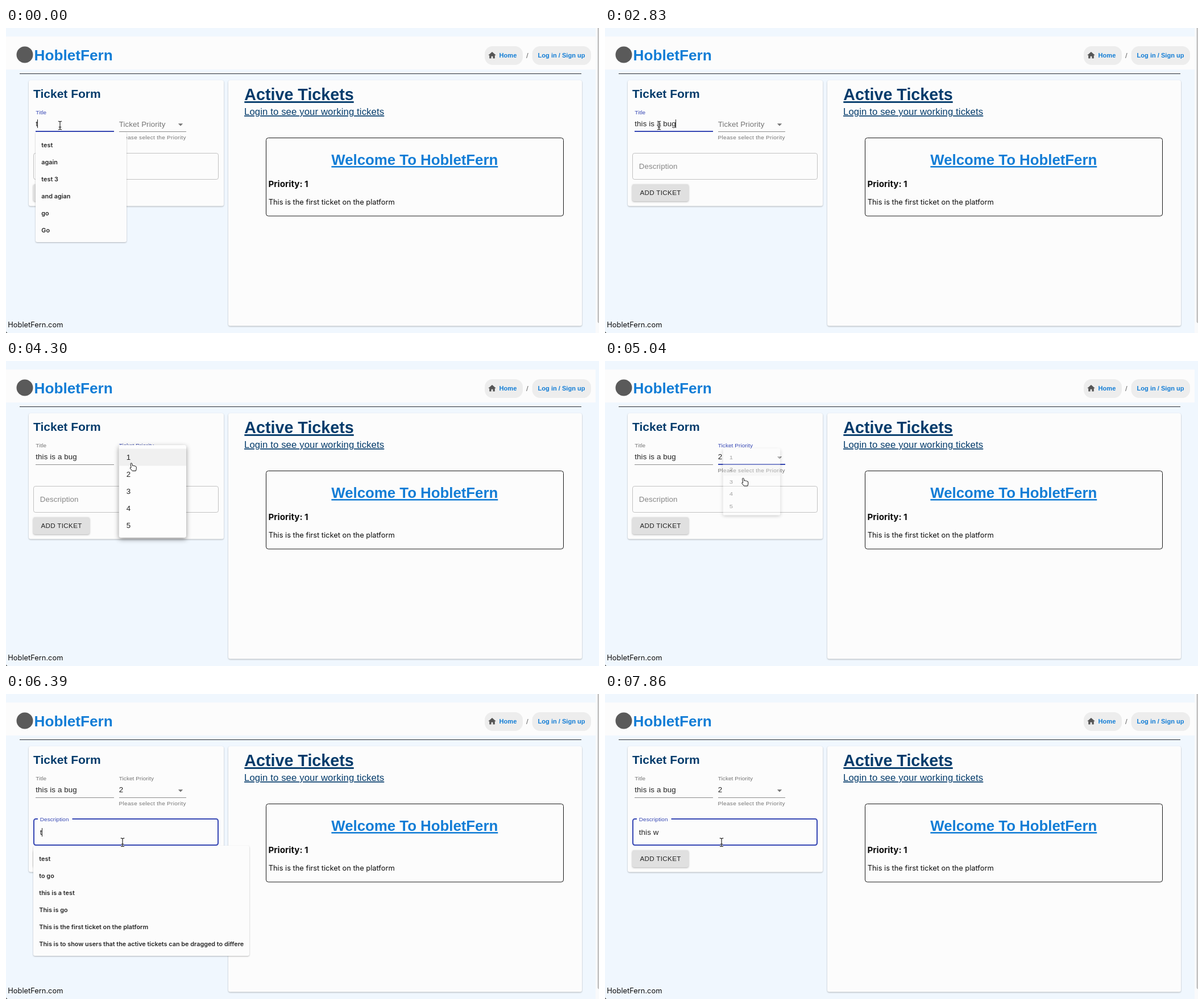
An HTML page that plays this animation: 1043x537 px, repeating every 8 s.

```html
<!DOCTYPE html>
<html lang="en">
<head>
<meta charset="utf-8">
<title>Ticket form</title>
<style>
  html, body { margin: 0; width: 100%; height: 100%; overflow: hidden; background: #f0f7fe; }
  svg { display: block; width: 100vw; height: 100vh; }
  text { font: 13.28px "Liberation Sans", Arial, sans-serif; fill: #212121; }
  .b { font-weight: 700; }
  .navy { fill: #033b6b; }
  .blue { fill: #127dd6; }
  .u { text-decoration: underline; text-decoration-thickness: 2px; }
  .sys { font-family: Inter, sans-serif; fill: #0c0c0c; }
  .sug { font: 600 10.85px Inter, sans-serif; fill: #262626; }
  .field { letter-spacing: .125px; }
  .label { letter-spacing: .125px; fill: #757575; }
  .small { font-size: 9.96px; letter-spacing: .094px; fill: #757575; }
  .card { fill: #fcfcfc; filter: drop-shadow(0 1px 1.2px rgba(0,0,0,.28)); }
  .menu { fill: #fdfdfd; filter: drop-shadow(0 3px 4px rgba(0,0,0,.42)); }
</style>
</head>
<body>
<svg viewBox="0 0 1043 537" preserveAspectRatio="none">
  <rect width="1043" height="537" fill="#f0f7fe"/>
  <rect y="15" width="1037" height="58" fill="#fcfcfc"/>
  <circle cx="33" cy="47" r="14.5" fill="#5a5a5a"/>
  <text class="b blue" x="49.5" y="57" style="font-size:26.2px">HobletFern</text>
  <rect x="842" y="32" width="67" height="33" rx="14" fill="#ededed"/>
  <path d="M855 42l-6.8 6h2v5.6h3.4v-3.8h2.8v3.8h3.4V48h2z" fill="#555"/>
  <text class="b blue" x="867.6" y="52.4" style="font-size:11.07px">Home</text>
  <text x="915" y="53" style="fill:#666">/</text>
  <rect x="925.5" y="32" width="103.5" height="33" rx="14" fill="#ededed"/>
  <text class="b blue" x="935.6" y="52.4" style="font-size:11.07px">Log in / Sign up</text>
  <path d="M24 80.5H1012" stroke="#2b2f33"/>

  <rect class="card" x="391" y="92" width="622" height="432.5" rx="3.5"/>
  <text class="b navy u" x="419.3" y="127" style="font-size:28.7px">Active Tickets</text>
  <text class="navy u" x="419" y="153" style="font-size:16.7px;letter-spacing:.125px;text-decoration-thickness:1px">Login to see your working tickets</text>
  <rect x="457.5" y="193.5" width="523" height="137.5" rx="4" fill="none" stroke="#1a1a1a"/>
  <text class="b blue u" x="718.8" y="241" text-anchor="middle" style="font-size:25.8px">Welcome To HobletFern</text>
  <text class="sys b" x="461.5" y="280" style="font-size:15.2px">Priority: 1</text>
  <text class="sys" x="461.7" y="311" style="font-size:12.85px">This is the first ticket on the platform</text>
  <text class="sys" x="3.3" y="527" style="font-size:12.85px">HobletFern.com</text>
  <path d="M0 534V537H3Q.5 536.5 0 534" fill="#444"/>

  <rect class="card" x="40" y="92" width="343" height="221.5" rx="3.5"/>
  <text class="b navy" x="48" y="123" style="font-size:21px">Ticket Form</text>

  <text class="small" id="titleLabel" x="52.3" y="152">Title</text>
  <text class="field" id="title" x="52.3" y="173"></text>
  <path id="titleLine"/>

  <path d="M199 182.5H317" stroke="#8c8c8c"/>
  <path id="prioLine" stroke-width="2"/>
  <path d="M302.8 168.2h8.4l-4.2 4.2z" fill="#757575"/>
  <text class="label" id="prioLabel">Ticket Priority</text>
  <text class="field" id="prio" x="198.8" y="173"></text>
  <text class="small" x="198.6" y="196.3" style="letter-spacing:.33px">Please select the Priority</text>

  <rect id="box" rx="3.4" fill="none"/>
  <rect id="notch" x="56" y="218" width="60.5" height="4" fill="#fcfcfc"/>
  <text class="label" id="descLabel">Description</text>
  <text class="field" id="desc" x="59.8" y="248"></text>

  <rect x="48" y="275" width="99" height="30" rx="3.4" fill="#e0e0e0" style="filter:drop-shadow(0 1.5px 1.5px rgba(0,0,0,.3))"/>
  <text x="61.5" y="294" style="font-size:11.62px;letter-spacing:.332px">ADD TICKET</text>

  <rect id="caret" width="1" height="15" fill="#222"/>
  <g id="popups"></g>
  <g id="menu">
    <rect class="menu" x="198.7" y="148" width="118.3" height="163" rx="3.4"/>
    <rect id="row" x="198.7" width="118.3" height="30" fill="#f0f0f0"/>
    <g id="digits"></g>
  </g>
  <g id="bar">
    <rect x="1037" width="6" height="537" fill="#f9fafb"/>
    <rect x="1040.5" y="-4" width="6" height="523.5" rx="3" fill="#c2c2c2"/>
  </g>
  <g id="beam" fill="none" stroke-linecap="round"></g>
  <path id="hand" fill="#fff" stroke="#111" stroke-linejoin="round"
    d="M-3.4 1.2L-4.4-5.2a1.3 1.3 0 0 1 2.6-.4L-1.1-2Q.2-3.2 1.4-1.8Q2.7-2.6 3.6-1.2Q5.4-1.6 5.7.2L5.8 3.2L4.8 7H-1.4L-5.2 2.4Q-5.4.4-3.4 1.2z"/>
</svg>
<script>
const LOOP = 8000;
const $ = id => document.getElementById(id);
const set = (id, attrs) => { for (const k in attrs) $(id).setAttribute(k, attrs[k]); };
const show = (id, on) => $(id).style.display = on ? '' : 'none';
const mix = (a, b, p) => a + (b - a) * p;

const thisRows = ['this is a test', 'This is go', 'This is the first ticket on the platform',
  'This is to show users that the active tickets can be dragged to differe'];
const popups = {
  title: [52, 183, 160, ['test', 'again', 'test 3', 'and agian', 'go', 'Go']],
  recent: [48, 267, 326, ['test', 'again', 'and agian', 'go', ...thisRows.slice(0, 2)]],
  wide: [48, 267, 380, ['test', 'to go', ...thisRows]],
  match: [48, 267, 380, thisRows]
};
$('popups').innerHTML = Object.entries(popups).map(([id, [x, y, w, rows]]) =>
  `<g id="pop-${id}"><rect class="card" x="${x}" y="${y}" width="${w}" height="${rows.length * 30 + 14}" rx="3"/>` +
  rows.map((s, i) => `<text class="sug" x="${x + 10.3}" y="${y + 26.6 + i * 30}">${s}</text>`).join('') + '</g>').join('');

$('digits').innerHTML = [0, 1, 2, 3, 4].map(i =>
  `<text x="211.8" y="${173.9 + i * 29.95}">${i + 1}</text>`).join('');

const beamPath = 'M-2.8-7.3Q0-7.5 0-5.8Q0-7.5 2.8-7.3M0-5.8V5.8M-2.8 7.3Q0 7.5 0 5.8Q0 7.5 2.8 7.3M-1.8 3H1.8';
$('beam').innerHTML = `<path d="${beamPath}" stroke="#fff" stroke-width="2.6"/><path d="${beamPath}" stroke="#111" stroke-width="1.1"/>`;

const start = {
  title: 't', desc: '', prio: '', focus: 'title', caret: 1, popup: 'title',
  menu: 0, row: 0, bar: 1, up: 0, descUp: 0, line: 0, hand: 0, x: 95, y: 171.5
};

// Each step holds only what changes at that moment.
const steps = [
  [150, { title: 'th' }],
  [300, { title: 'thi', popup: '' }],
  [440, { title: 'this ' }],
  [590, { title: 'this i' }],
  [740, { title: 'this is' }],
  [1040, { title: 'this is ' }],
  [1490, { caret: 0 }],
  [1940, { caret: 1 }],
  [2230, { title: 'this is a' }],
  [2380, { title: 'this is a ' }],
  [2530, { title: 'this is a b' }],
  [2680, { title: 'this is a bu' }],
  [2830, { title: 'this is a bug' }],
  [3270, { caret: 0 }],
  [3420, { x: 128, y: 173 }],
  [3570, { x: 203, y: 179, hand: 1 }],
  [3720, { x: 218, y: 184 }],
  [3870, { x: 223.5, y: 186.5, focus: 'prio', up: .3, line: .3 }],
  [4010, { menu: .7, up: 1, line: 1, bar: 0 }],
  [4150, { menu: 1 }],
  [4450, { x: 233, y: 199 }],
  [4600, { x: 246, y: 213 }],
  [4890, { row: 1 }],
  [5040, { menu: .4, prio: '2' }],
  [5190, { menu: 0, bar: 1 }],
  [5340, { x: 237, y: 224, hand: 0 }],
  [5490, { x: 218, y: 249 }],
  [5640, { x: 205, y: 261.2 }],
  [5790, { focus: 'desc', caret: 1, descUp: .26, line: .74 }],
  [5940, { descUp: .97, line: 0 }],
  [6090, { descUp: 1, popup: 'recent' }],
  [6390, { desc: 't', popup: 'wide' }],
  [6540, { desc: 'th', popup: 'match' }],
  [6690, { desc: 'thi' }],
  [6840, { desc: 'this' }],
  [6980, { desc: 'this ' }],
  [7130, { desc: 'this w' }],
  [7270, { popup: '' }],
  [7720, { caret: 0 }]
];

function stateAt(t) {
  const s = { ...start };
  for (const [at, change] of steps) if (t >= at) Object.assign(s, change);
  return s;
}

function type(id, s) {
  $(id).textContent = s.replace(/ /g, '\u00a0');
  return s ? $(id).getComputedTextLength() : 0;
}

function floatLabel(id, x, y0, y1, p, color) {
  set(id, { transform: `translate(${x} ${mix(y0, y1, p)}) scale(${mix(1, .75, p)})` });
  $(id).style.fill = color;
}

function render(t) {
  const s = stateAt(t), accent = '#3647b4', grey = '#757575';
  const onTitle = s.focus === 'title', onDesc = s.focus === 'desc';
  const titleEnd = 52 + type('title', s.title);
  const descEnd = 59.6 + type('desc', s.desc);
  type('prio', s.prio);

  $('titleLabel').style.fill = onTitle ? accent : grey;
  set('titleLine', {
    d: `M52 ${onTitle ? 182 : 182.5}H190`,
    stroke: onTitle ? accent : '#8c8c8c', 'stroke-width': onTitle ? 2 : 1
  });

  const half = 59 * s.line;
  set('prioLine', { d: `M${258 - half} 182H${258 + half}`, stroke: accent });
  show('prioLine', s.line > 0);
  const prioBlue = s.focus === 'prio' || (onDesc && s.line > 0);
  floatLabel('prioLabel', 198.7, 174, 152, s.up, prioBlue ? accent : grey);

  const inset = onDesc ? 1 : .5, top = onDesc ? 219 : 220;
  set('box', {
    x: 48 + inset, y: top + inset, width: 326 - 2 * inset, height: 267 - top - 2 * inset,
    stroke: onDesc ? accent : '#c2c2c2', 'stroke-width': 2 * inset
  });
  show('notch', s.descUp > .5);
  floatLabel('descLabel', 59.8, 248, 223.8, s.descUp, s.descUp > .5 ? accent : '#858585');

  show('caret', s.caret);
  set('caret', onDesc ? { x: Math.round(descEnd), y: 236 } : { x: Math.floor(titleEnd), y: 161 });

  for (const id in popups) show('pop-' + id, s.popup === id);

  show('menu', s.menu > 0);
  const sx = mix(.75, 1, s.menu), sy = sx * sx;
  set('menu', {
    opacity: s.menu,
    transform: `translate(258 169) scale(${sx} ${sy}) translate(-258 -169)`
  });
  set('row', { y: 154.5 + s.row * 29.9 });
  show('bar', s.bar);

  show('hand', s.hand);
  show('beam', !s.hand);
  set(s.hand ? 'hand' : 'beam', { transform: `translate(${s.x} ${s.y})` });
}

const begin = performance.now();
function tick() {
  render((performance.now() - begin) % LOOP);
  requestAnimationFrame(tick);
}
tick();
</script>
</body>
</html>
```
